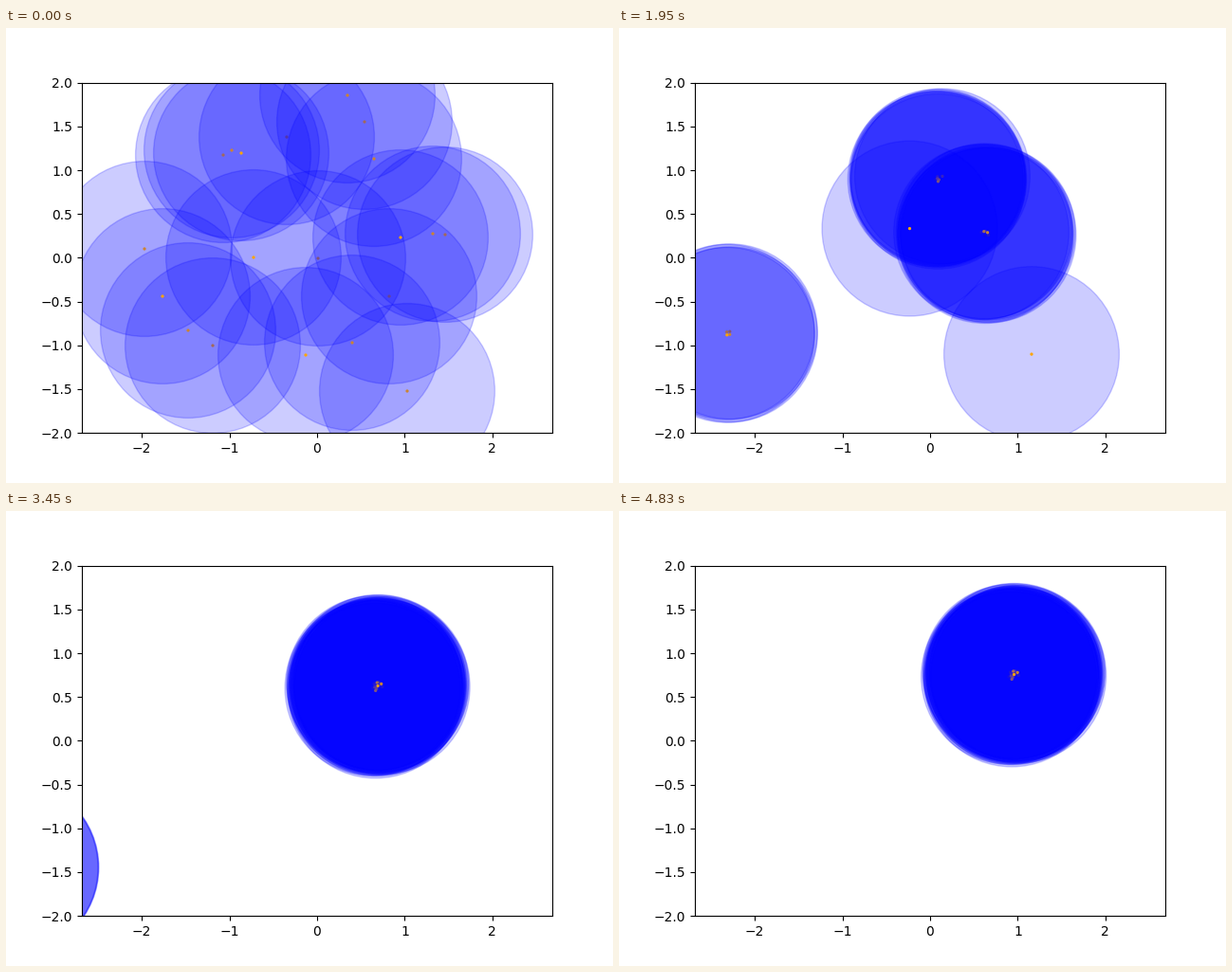
A matplotlib script that plays this animation: 640x480 px, repeating every 4.86 s.

```python
import numpy as np
import matplotlib.pyplot as plt
from matplotlib.animation import FuncAnimation

FRAMES, INTERVAL = 162, 30
UNIT = 92.4                       # pixels per data unit
ORIGIN = np.array([328, 242.4])   # stage pixel of the data origin

# Drawn back to front: group, start, first meeting point, spread inside the swarm
AGENTS = [
    ("stray", 423, 383, 425, 382, 0, -4),
    ("right", 329, 243, 344, 245, 4, 5),
    ("top", 296, 115, 264, 125, -5, 1),
    ("right", 404, 283, 411, 261, 8, -1),
    ("top", 378, 99, 363, 107, -19, 7),
    ("right", 463, 218, 432, 230, -13, -11),
    ("right", 450, 217, 432, 229, 20, 2),
    ("top", 360, 71, 364, 106, -10, -5),
    ("top", 388, 138, 366, 112, 13, -7),
    ("right", 416, 221, 432, 228, 5, -16),
    ("top", 229, 134, 265, 126, -10, 4),
    ("top", 238, 129, 264, 125, -3, 9),
    ("top", 248, 132, 264, 124, -7, 17),
    ("left", 218, 335, 183, 308, 8, -8),
    ("left", 146, 233, 153, 264, -6, -6),
    ("left", 192, 319, 183, 309, 8, 6),
    ("left", 165, 283, 175, 299, -5, 8),
    ("right", 365, 332, 367, 323, -1, -15),
    ("right", 316, 345, 340, 331, 16, -10),
    ("middle", 261, 242, 257, 241, 2, -2),
]

# Group centres at the later key times
KEYS = np.array([0, 19, 44, 65, 85, 115, 130, 161])
LATE = [(391.5, 185), (400, 181), (416, 173)]
SWARM = [(370, 187)] + LATE
PATHS = {
    "top": [(314, 121), (338, 158)] + SWARM,
    "right": [(397, 259), (385, 218)] + SWARM,
    "middle": [(265, 229), (306, 212)] + SWARM,
    "stray": [(431, 370), (435, 345), (427, 296)] + LATE,
    "left": [(152, 304), (115, 322), (75, 341), (5, 376), (-32, 394), (-108, 430)],
}

points = np.array([[a[1:3], a[3:5]] + PATHS[a[0]] for a in AGENTS], float)
points = points.transpose(1, 0, 2)
slopes = np.gradient(points, KEYS, axis=0)
offsets = np.array([a[5:] for a in AGENTS], float)
pulsing = np.array([[a[0] != "left"] for a in AGENTS], float)


def base(t):
    """Cubic Hermite position of every agent at time t."""
    k = min(np.searchsorted(KEYS, t, side="right") - 1, len(KEYS) - 2)
    span = KEYS[k + 1] - KEYS[k]
    u = (t - KEYS[k]) / span
    rise = u * u * (3 - 2 * u)
    return (points[k] * (1 - rise) + points[k + 1] * rise
            + span * u * (1 - u) * ((1 - u) * slopes[k] - u * slopes[k + 1]))


def positions(t):
    calm = np.interp(t, [19, 44, 85, 95], [0, 0.2, 0.25, 0.05])
    pulse = np.interp(t, [85, 100], [0, 1.29]) * np.sin(np.pi * (t - 113.5) / 23)
    calm_part = calm * (1 - pulsing * np.interp(t, [85, 95], [0, 1]))
    px = base(t) + offsets * (calm_part + pulse * pulsing)
    return (px - ORIGIN) / UNIT * [1, -1]


fig = plt.figure(figsize=(6.4, 4.8), dpi=100)
ax = fig.add_axes([0.125, 0.11, 0.775, 0.77])
ax.set_xlim(-248 / UNIT, 248 / UNIT)
ax.set_ylim(-2, 2)
ax.set_xticks(range(-2, 3))

pairs = []
for _ in AGENTS:
    disc = plt.Circle((0, 0), 1, color="blue", alpha=0.2)
    dot = plt.Circle((0, 0), 0.01, color="orange")
    ax.add_patch(disc)
    ax.add_patch(dot)
    pairs.append((disc, dot))


def update(frame):
    for pair, xy in zip(pairs, positions(frame)):
        for patch in pair:
            patch.set_center(xy)
    return [patch for pair in pairs for patch in pair]


anim = FuncAnimation(fig, update, frames=FRAMES, interval=INTERVAL,
                     repeat=True, repeat_delay=0, blit=False)
plt.show()
```
